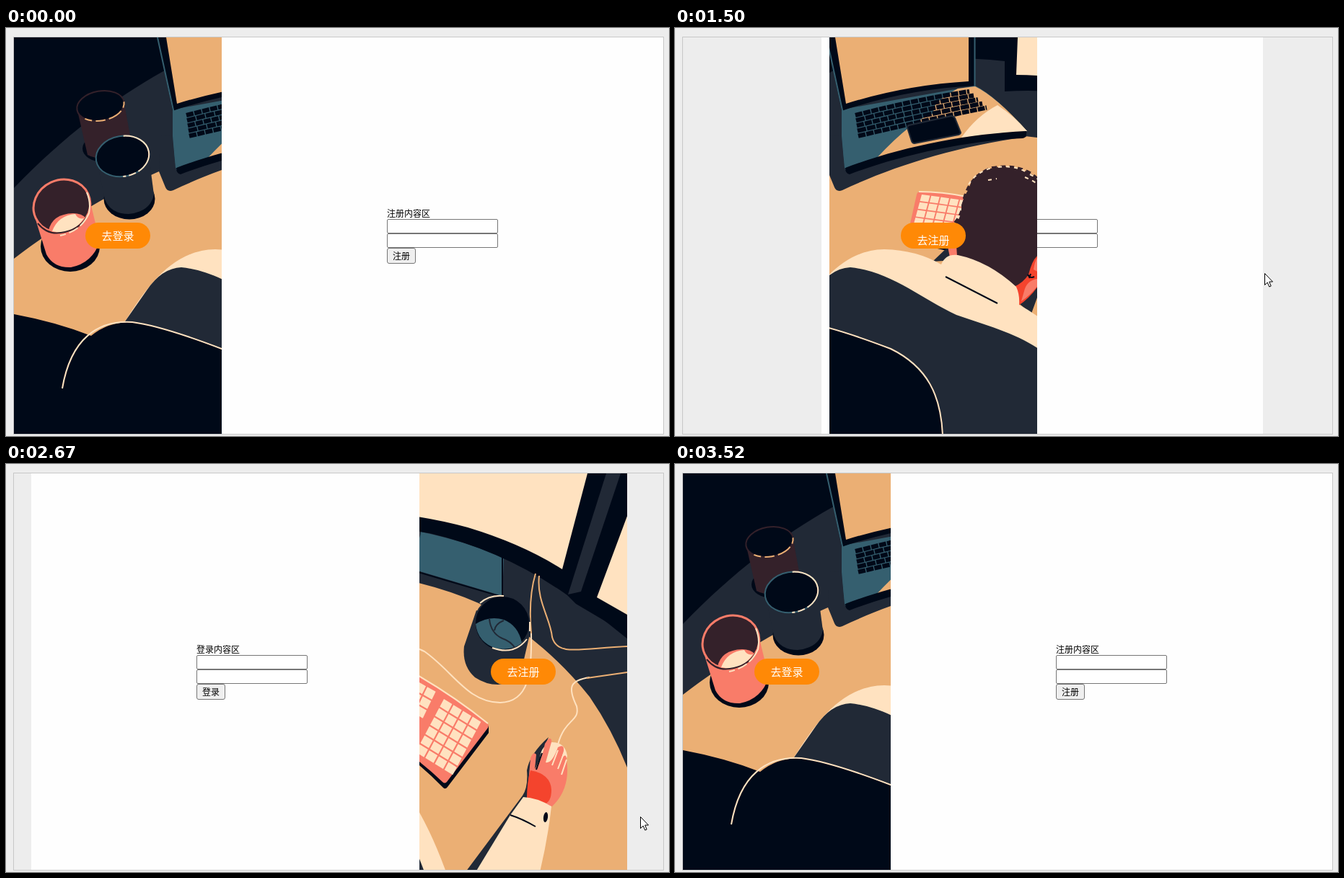
Write an HTML page that moves like this. It is 919 px wide and 566 px high and loops after 3910 ms.

```html
<!DOCTYPE html>
<html lang="zh">
<head>
<meta charset="utf-8">
<title>登录 / 注册</title>
<style>
  html, body { margin: 0; width: 100%; height: 100%; overflow: hidden; background: #ededed; }
  body { position: relative; font: 12px/16px "Noto Sans CJK SC", "Noto Sans CJK", "Noto Sans", sans-serif; color: #000; }
  body > * { position: absolute; left: 0; top: 0; }
  #box { left: 10px; top: 12px; width: 900px; height: 550px; border: 1px solid #c8c8c8; }
  #panel { top: 13px; width: 612px; height: 550px; background: #fefefe; }
  #form { position: absolute; left: 229px; top: 236px; width: 154px; }
  #form div { height: 16px; white-space: nowrap; }
  #form i { display: block; box-sizing: border-box; height: 20px; border: 1px solid #767676; border-radius: 2px; background: #fff; }
  #form b { display: block; box-sizing: border-box; width: 40px; height: 22px; border: 1px solid #767676;
    border-radius: 3px; background: #efefef; font-weight: 400; line-height: 20px; text-align: center; }
  #btn { top: 270px; width: 90px; height: 36px; border-radius: 18px; background: #ff8906; overflow: hidden;
    color: #fff; font-size: 15px; line-height: 36px; text-align: center; }
  #btn span { display: block; height: 36px; }
</style>
</head>
<body>
<div id="box"></div>
<div id="panel"><div id="form"><div id="title"></div><i></i><i></i><b id="send"></b></div></div>

<svg id="art" width="919" height="566" viewBox="0 0 919 566" fill="none">
  <style>
    .n { fill: #000918 } .s { fill: #212936 } .t { fill: #ebaf74 } .c { fill: #ffe2c0 }
    .e { fill: #355f6f } .k { fill: #f97c69 } .r { fill: #f4442d } .b { fill: #34212a }
    .sn { stroke: #000918 } .ss { stroke: #212936 } .st { stroke: #ebaf74 } .sc { stroke: #ffe2c0 }
    .se { stroke: #355f6f } .sk { stroke: #f97c69 } .sb { stroke: #34212a }
    #art path, #art ellipse { stroke-width: 2 }
  </style>
  <path class="n" d="M0 0H919V566H0Z"/>
  <!-- desk -->
  <path class="s" d="M11 222C80 150 150 98 218 60C290 40 380 38 457 46C600 60 760 150 911 285V566H11Z"/>
  <path class="t" d="M11 320C70 275 140 230 212 199C300 165 400 148 485 150Q580 160 655 193Q745 243 809 323Q840 368 861 421Q885 475 900 566H11Z"/>

  <!-- laptop -->
  <path class="s" d="M214 150L212 199L221 221Q224 228 232 225C300 193 385 165 487 151L480 130Z"/>
  <path class="e" d="M231 113L416 80Q445 95 488 143C400 150 310 170 236 197Q231 160 231 113Z"/>
  <path class="t" d="M279 181Q330 126 360 118Q350 107 392 84L416 81Q445 95 488 143C410 150 340 162 279 181Z"/>
  <path class="c" d="M447 107Q470 122 488 143Q440 146 397 152Q418 122 447 107Z"/>
  <path class="n" d="M236 194C310 166 400 147 487 143Q488 152 482 153C400 157 310 177 242 203Q236 202 236 194Z"/>
  <path class="n" d="M210 13L231 115Q320 85 415 80V13Z"/>
  <path class="se" d="M210 13L232 114V150L236 194M415.500 13V80"/>
  <path class="t" d="M222 13L237 105Q320 79 407 74V13Z"/>
  <g id="rows" class="sn"></g>
  <path class="n ss" d="M324 135L383 122Q386 122 388 125L396 145Q396 147 393 148L332 160Q329 160 328 157L322 138Q322 136 324 135Z"/>

  <!-- cups on the left -->
  <ellipse class="n" cx="135" cy="167" rx="29" ry="19"/>
  <path class="b" d="M98 110L113 176Q140 190 174 160L163 100Z"/>
  <ellipse class="n sb" cx="131" cy="108" rx="33" ry="20.500" transform="rotate(-10 131 108)"/>
  <ellipse class="st" cx="131" cy="108" rx="33" ry="20.500" transform="rotate(-10 131 108)" pathLength="100" stroke-dasharray="5 3 12 3 8 3 6 60"/>
  <ellipse class="n" cx="171" cy="237" rx="35.500" ry="28.500"/>
  <path class="s" d="M126 185L137 238Q145 258 170 258Q200 255 205 231L198 178Z"/>
  <ellipse class="n se" cx="161.500" cy="178" rx="37" ry="28" transform="rotate(-10 161 178)"/>
  <ellipse class="sc" cx="161.500" cy="178" rx="37" ry="28" transform="rotate(-10 161 178)" pathLength="100" stroke-dasharray="16 2 5 2 2 51 22 0"/>
  <ellipse class="n" cx="89" cy="303" rx="41" ry="35"/>
  <path class="k" d="M38 256L56 314Q66 333 90 332Q120 326 130 296L117 242Z"/>
  <ellipse class="b sk" cx="77.500" cy="247" rx="40" ry="36" transform="rotate(-25 77 247)" style="stroke-width:3"/>
  <path class="k" d="M59 281Q64 258 93 257Q105 257 111 264Q97 284 77 284Z"/>
  <path class="c" d="M64 282Q72 260 96 258Q100 266 108 264Q94 284 76 284Z"/>
  <path class="sb" d="M44 271Q57 287 76 284Q100 281 112 262"/>
  <path class="sc" d="M75 288Q104 282 115 257Q118 242 112 228" stroke-dasharray="8 5 14 4 60"/>

  <!-- monitors -->
  <path class="e" d="M575 94Q640 108 690 130L688 183L533 137Q574 116 575 94Z"/>
  <path class="sn" d="M533 138.500L688 184.500V130"/>
  <path class="n" d="M457 13V88Q521 84 587 96Q690 120 778 182L790 194L861 236L911 285V13Z"/>
  <path class="c" d="M475 13L473 65Q560 66 640 88Q716 111 771 146L806 13Z"/>
  <path class="s" d="M832 13H852L797 177L779 181Z"/>
  <path class="c" d="M883 13L819 185L861 209L911 244V13Z"/>

  <!-- cables -->
  <path class="sc" d="M535 260Q550 245 580 260C620 288 640 331 685 331C725 330 729 290 728 235"/>
  <path class="st" d="M728 235C725 200 728 172 734 152M739 155C735 190 755 215 757 240C764 267 795 256 861 253"/>
  <path class="sc" d="M765 389C775 352 796 358 791 336C778 309 782 300 809 296"/>
  <path class="st" d="M805 297L861 289L911 281"/>

  <!-- right cup -->
  <path class="s" d="M652 203L635 253Q632 280 650 296Q665 306 682 306Q705 304 714 288L727 232Z"/>
  <ellipse class="n ss" cx="688" cy="221" rx="38" ry="38"/>
  <path class="e" d="M651 222Q670 210 690 216Q710 224 715 248Q703 259 680 256Q654 248 651 222Z"/>
  <path class="ss" d="M670 215Q672 235 688 242Q700 246 706 256M677 231Q678 222 690 217"/>
  <path class="sc" d="M657 193Q670 181 690 183M674 255Q704 266 722 243M726 219V232"/>

  <!-- keyboards -->
  <path class="n" d="M322 288L320 296L390 312V302Z"/>
  <path class="k" d="M340 227Q370 227 405 234L392 309L325 293Q321 292 322 289L335 231Q336 227 340 227Z"/>
  <path class="sc" d="M338 227Q370 227 404 234"/>
  <path class="n" d="M507 371Q560 402 606 449Q609 452 612 448L669 373V363Z"/>
  <path class="k" d="M538 275Q610 313 667 359Q670 362 668 366L611 441Q608 444 605 441Q560 398 508 370Z"/>
  <path class="sc" d="M538 275Q610 313 668 360"/>
  <g id="keys" class="c"></g>

  <!-- hand and mouse -->
  <path class="s" d="M752 379Q726 402 722 425Q724 448 716 460L637 566H668L722 480L735 420Z"/>
  <path class="c" d="M741 420Q736 395 755 386Q775 385 778 405L770 430Z"/>
  <path class="k" d="M752 381Q757 380 756 386L748 414Q757 416 765 393Q774 388 773 398L770 408Q777 400 777 410Q783 450 757 475L722 466L727 408Q731 398 735 403L733 423Q743 410 747 388Z"/>
  <path class="sc" d="M765 397L757 418M773 402L765 423M777 410L770 431"/>
  <path class="r" d="M727 425Q755 430 756 452Q756 470 745 472L722 465Q722 440 727 425Z"/>
  <path class="sn" d="M743 401L735 424"/>
  <path class="c" d="M717 462Q737 463 756 475Q751 520 740 566H651L699 487Z"/>
  <path class="sn" d="M699 487Q715 492 734 503"/>
  <ellipse class="n" cx="748" cy="490" rx="3" ry="7" transform="rotate(8 748 490)"/>

  <!-- seated figure -->
  <path class="s" d="M357 324L380 302L386 322ZM518 330L494 396L474 380Z"/>
  <path class="k" d="M378 303L390 288L398 322L381 318Z"/>
  <path class="r" d="M486 330L500 318Q512 306 517 318Q517 332 510 347Q496 372 476 385L466 358Z"/>
  <path class="k" d="M497 335Q500 314 511 312Q519 316 515 330L508 341ZM484 365Q488 347 510 347Q497 368 480 379Z"/>
  <path class="b" d="M388 272Q398 262 397 246Q401 232 407 224Q412 203 430 197Q460 187 487 199Q509 209 521 229Q536 250 537 284Q534 310 514 340L510 347Q520 316 511 312Q497 313 490 342Q483 353 470 359Q435 332 391 316Z"/>
  <path class="sb" d="M388 270Q399 258 401 236Q410 204 440 194Q470 189 492 201Q522 222 534 256Q539 285 534 302" stroke-dasharray="7 5" style="stroke-width:4"/>
  <path class="sc" d="M407 217Q418 199 440 194M448 193Q471 190 489 201M492 203Q517 216 525 238M485 207Q510 217 518 236M532 250L535 292M434 211L446 209" stroke-dasharray="5 6"/>
  <path class="sn" d="M489 342Q492 348 498 345M491 347L493 341"/>
  <path class="c" d="M165 407C195 360 230 308 290 307Q335 308 369 328Q375 313 392 315Q435 324 473 359Q478 370 477 384Q505 399 530 423Q575 470 610 566H165Z"/>
  <path class="sn" d="M375 345L447 382"/>
  <path class="s" d="M165 407L195 364Q216 333 243 332C300 338 340 375 390 398C440 415 495 430 525 463Q558 505 580 566H165Z"/>
  <path class="n" d="M11 397Q70 408 118 427Q142 407 175 408Q215 413 299 445C350 470 369 510 371 566H11Z"/>
  <path class="sc" d="M78 500C90 430 128 405 175 408Q215 413 299 445C350 470 369 510 371 566"/>
</svg>

<div id="btn"><div id="words"><span>去登录</span><span>去注册</span></div></div>

<svg id="cursor" width="30" height="34" viewBox="-10 -2 30 34" fill="#fff" stroke="#000">
  <path id="arrow" d="M.5 .5V16.500L4.200 13L6.800 19L9.200 18L6.700 12H11.500Z"/>
  <path id="hand" d="M-2 2.500A2 2 0 0 1 2 2.500V9C3 8 5 8 5.500 9.500C7 8.700 8.500 9.300 8.800 10.500C10 10 11.500 10.800 11.500 12.500V17C11.500 20 10 21 9.500 24H-1C-1.500 21 -4 19 -6.500 14.500C-7.300 12.500 -5.500 11.500 -4 13L-2 15Z"/>
</svg>

<script>
const $ = id => document.getElementById(id);
const LOOP = 3910, STEP = 78, PHASE = 1024;
const GO = 1098, BACK = 2465, SLIDE = 985;

// Cursor tip: time, x, y
const PATH = [
  [88, 781, 481], [556, 275, 361], [868, 196, 295], [1180, 196, 295], [1492, 817, 340],
  [2038, 817, 340], [2272, 784, 296], [2506, 784, 296], [2662, 879, 489], [2818, 907, 556]
];

function addKeys(x, y, [ux, uy], [vx, vy], cols, rows) {
  let d = "";
  for (let r = 0; r < rows; r++)
    for (let c = 0; c < cols; c++) d += `M${c} ${r}h.86v.84h-.86z`;
  $("keys").innerHTML += `<path d="${d}" transform="matrix(${ux} ${uy} ${vx} ${vy} ${x} ${y})"/>`;
}
addKeys(342, 231, [13.3, 1.8], [-2.9, 10.7], 5, 6);
addKeys(557, 294, [13.5, 7.6], [-6.3, 13], 3, 3);
addKeys(607, 326, [13.3, 8.2], [-6.7, 12.6], 4, 6);
addKeys(528, 359, [13, 8], [-6, 12], 3, 1);
addKeys(547, 353, [10, 6], [-6, 12], 1, 1);
addKeys(537, 281, [7, 4], [-4, 9], 1, 1);

for (let i = 0; i < 5; i++) {
  const y = 121 + 7.2 * i;
  $("rows").innerHTML += `<path d="M${250 + i} ${y}Q${335 + i * 3} ${y - 22} ${408 + 6 * i} ${88 + 5.6 * i}"
    stroke-dasharray="${10 + i % 2 * 2} 1.300" style="stroke-width:6.200"/>`;
}

// Standard ease-in-out curve
function ease(x) {
  if (x <= 0) return 0;
  if (x >= 1) return 1;
  let lo = 0, hi = 1, s;
  for (let i = 0; i < 24; i++) {
    s = (lo + hi) / 2;
    const at = 3 * s * (1 - s) * (.42 * (1 - s) + .58 * s) + s ** 3;
    if (at < x) lo = s; else hi = s;
  }
  return s * s * (3 - 2 * s);
}
const ramp = (t, start, length) => ease((t - start) / length);

function cursorAt(t) {
  const i = PATH.findIndex(p => p[0] > t);
  if (i < 0) return PATH[PATH.length - 1].slice(1);
  const [t0, x0, y0] = PATH[Math.max(0, i - 1)], [t1, x1, y1] = PATH[i];
  const f = t1 > t0 ? (t - t0) / (t1 - t0) : 0;
  return [x0 + (x1 - x0) * f, y0 + (y1 - y0) * f];
}

function draw(time) {
  const t = PHASE + STEP * Math.floor((time % LOOP - PHASE) / STEP);
  const p = ramp(t, GO, SLIDE) - ramp(t, BACK, SLIDE);
  const left = Math.round(11 + 612 * p);
  $("art").style.clipPath = `inset(13px ${919 - left - 288}px 3px ${left}px)`;
  $("btn").style.left = left + 99 + "px";
  $("panel").style.left = Math.round(299 - 288 * p) + "px";

  const word = p > .5 ? "登录" : "注册";
  $("title").textContent = word + "内容区";
  $("send").textContent = word;
  const shift = ramp(t, GO, 550) - ramp(t, BACK + 510, 450);
  $("words").style.transform = `translateY(${Math.round(-36 * shift)}px)`;

  const [x, y] = cursorAt(t);
  const overButton = t > 800 && t < 1190 || t > 2200 && t < 2510;
  $("cursor").style.visibility = t > 80 && t < 2880 ? "visible" : "hidden";
  $("cursor").style.transform = `translate(${Math.round(x) - 10}px, ${Math.round(y) - 2}px)`;
  $("arrow").style.display = overButton ? "none" : "";
  $("hand").style.display = overButton ? "" : "none";
}

function loop() {
  draw(performance.now());
  requestAnimationFrame(loop);
}
loop();
</script>
</body>
</html>
```
